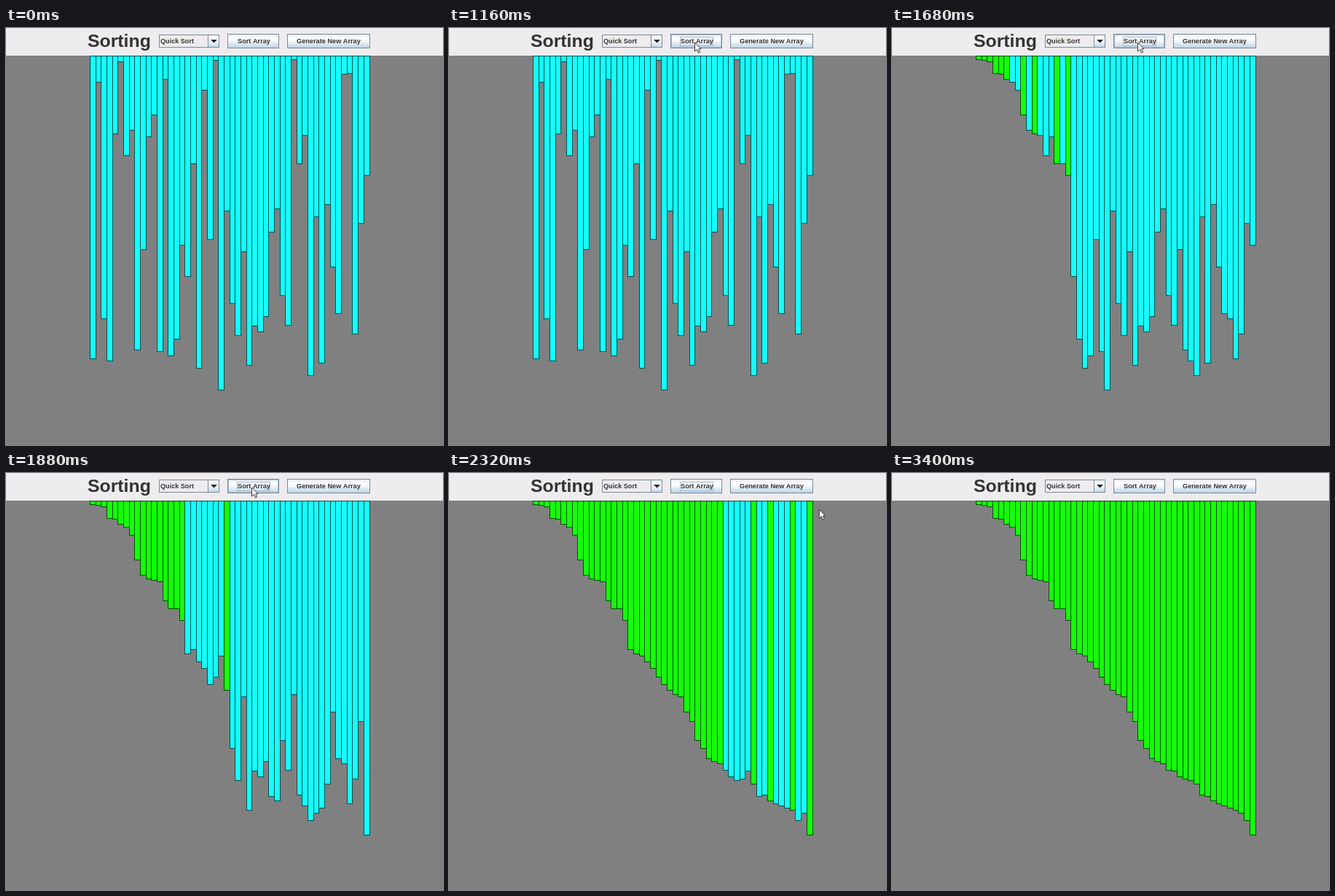
These frames come from a looping animation (600 by 573 pixels, 3.48 s). An HTML page with a canvas:

```html
<!DOCTYPE html>
<html lang="en">
<head>
<meta charset="utf-8">
<title>Sorting</title>
<style>
html, body { margin: 0; width: 600px; height: 573px; overflow: hidden; background: #808080; }
canvas { display: block; }
</style>
</head>
<body>
<canvas id="stage" width="600" height="573"></canvas>
<script>
const ctx = document.getElementById('stage').getContext('2d');
const LOOP = 3480, TOP = 38, LEFT = 115, PITCH = 7.67;
const FONT = '"Liberation Sans", Arial, sans-serif';

// Bottom edge of every bar, unsorted
const bars = [
  454, 74, 399, 457, 145, 46, 175, 140, 442, 304, 149, 119, 444, 70, 450, 427, 298,
  341, 186, 467, 85, 290, 44, 497, 251, 378, 422, 307, 463, 409, 417, 396, 280, 248,
  367, 408, 43, 186, 147, 477, 259, 460, 242, 328, 392, 63, 62, 420, 268, 202
];

// Quick sort with the last element as pivot; yields after each visible step
function* quickSort(a, done, lo, hi) {
  if (lo > hi) return;
  if (lo === hi) {
    done[lo] = true;
    yield;
    return;
  }
  const swap = (p, q) => { [a[p], a[q]] = [a[q], a[p]]; };
  const pivot = a[hi];
  let i = lo - 1, j = hi;
  for (;;) {
    while (a[++i] < pivot);
    while (j > lo && a[--j] > pivot);
    if (i >= j) break;
    swap(i, j);
    yield;
  }
  swap(i, hi);
  yield;
  done[i] = true;
  yield* quickSort(a, done, lo, i - 1);
  yield* quickSort(a, done, i + 1, hi);
}

function recordSteps() {
  const a = [...bars], done = a.map(() => false);
  const steps = [];
  const save = () => steps.push({ a: [...a], done: [...done] });
  save();
  for (const _ of quickSort(a, done, 0, a.length - 1)) save();
  save();
  return steps;
}
const steps = recordSteps();

// Linear interpolation through [time, ...values] keys, held at both ends
function track(keys, t) {
  if (t <= keys[0][0]) return keys[0].slice(1);
  for (let k = 1; k < keys.length; k++) {
    const [t0, ...from] = keys[k - 1], [t1, ...to] = keys[k];
    if (t < t1) return from.map((v, n) => v + (to[n] - v) * (t - t0) / (t1 - t0));
  }
  return keys[keys.length - 1].slice(1);
}
const progress = [[1315, 0], [1440, 9.5], [1880, 41.5], [2320, 75.5], [2480, steps.length - 1]];
const pointer = [[1000, 405, 100], [1120, 337, 20], [2120, 337, 20], [2320, 507, 50], [2440, 604, 67]];

function box(x, y, w, h, fill, stroke) {
  if (fill) {
    ctx.fillStyle = fill;
    ctx.fillRect(x, y, w, h);
  }
  if (stroke) {
    ctx.strokeStyle = stroke;
    ctx.strokeRect(x + .5, y + .5, w - 1, h - 1);
  }
}

function label(text, x, y, size) {
  ctx.font = `bold ${size}px ${FONT}`;
  ctx.fillStyle = '#333';
  ctx.fillText(text, x, y);
}

const metal = ctx.createLinearGradient(0, 8, 0, 28);
metal.addColorStop(0, '#dde8f3');
metal.addColorStop(.3, '#fff');
metal.addColorStop(.5, '#f4f8fb');
metal.addColorStop(1, '#b8cfe5');

function button(text, x, w, textX, hover, focus) {
  box(x, 8, w, 20, metal, '#7a8a99');
  if (hover) box(x + 1, 9, w - 2, 18, null, '#a4bbd4');
  if (focus) box(textX - 1, 12, 46, 13, null, '#a3b8cc');
  label(text, textX, 21, 9.2);
}

function drawHeader(t) {
  box(0, 0, 600, TOP, '#eeecee');
  label('Sorting', 112, 26, 24.8);
  box(210, 9, 83, 18, '#eeecee', '#7a8a99');
  box(277, 9, 16, 18, metal, '#7a8a99');
  label('Quick Sort', 212, 21, 9.1);
  ctx.fillStyle = '#222';
  ctx.beginPath();
  ctx.moveTo(281, 16);
  ctx.lineTo(290, 16);
  ctx.lineTo(285.5, 20.5);
  ctx.fill();
  button('Sort Array', 304, 71, 318, t >= 1100 && t < 2160, t >= 1120 && t < 3360);
  button('Generate New Array', 386, 114, 399, false, false);
}

function drawBars({ a, done }) {
  const edge = i => Math.round(LEFT + i * PITCH);
  a.forEach((bottom, i) => {
    const x = edge(i), w = edge(i + 1) - x + 1;
    box(x, TOP, w, bottom - TOP + 1, done[i] ? '#14ff08' : '#14ffff',
      done[i] ? '#084c06' : '#085050');
  });
}

function drawPointer(x, y) {
  ctx.beginPath();
  [[0, 0], [0, 12], [3, 9.5], [5, 14], [7, 13], [5.2, 8.8], [8.5, 8.5]]
    .forEach(([dx, dy]) => ctx.lineTo(x + dx + .5, y + dy));
  ctx.closePath();
  ctx.fillStyle = '#fff';
  ctx.fill();
  ctx.strokeStyle = '#333';
  ctx.stroke();
}

function draw(now) {
  const t = now % LOOP;
  box(0, 0, 600, 573, '#808080');
  drawHeader(t);
  drawBars(steps[Math.floor(track(progress, t)[0])]);
  if (t >= 1000 && t < 2440) drawPointer(...track(pointer, t));
  requestAnimationFrame(draw);
}
requestAnimationFrame(draw);
</script>
</body>
</html>
```
